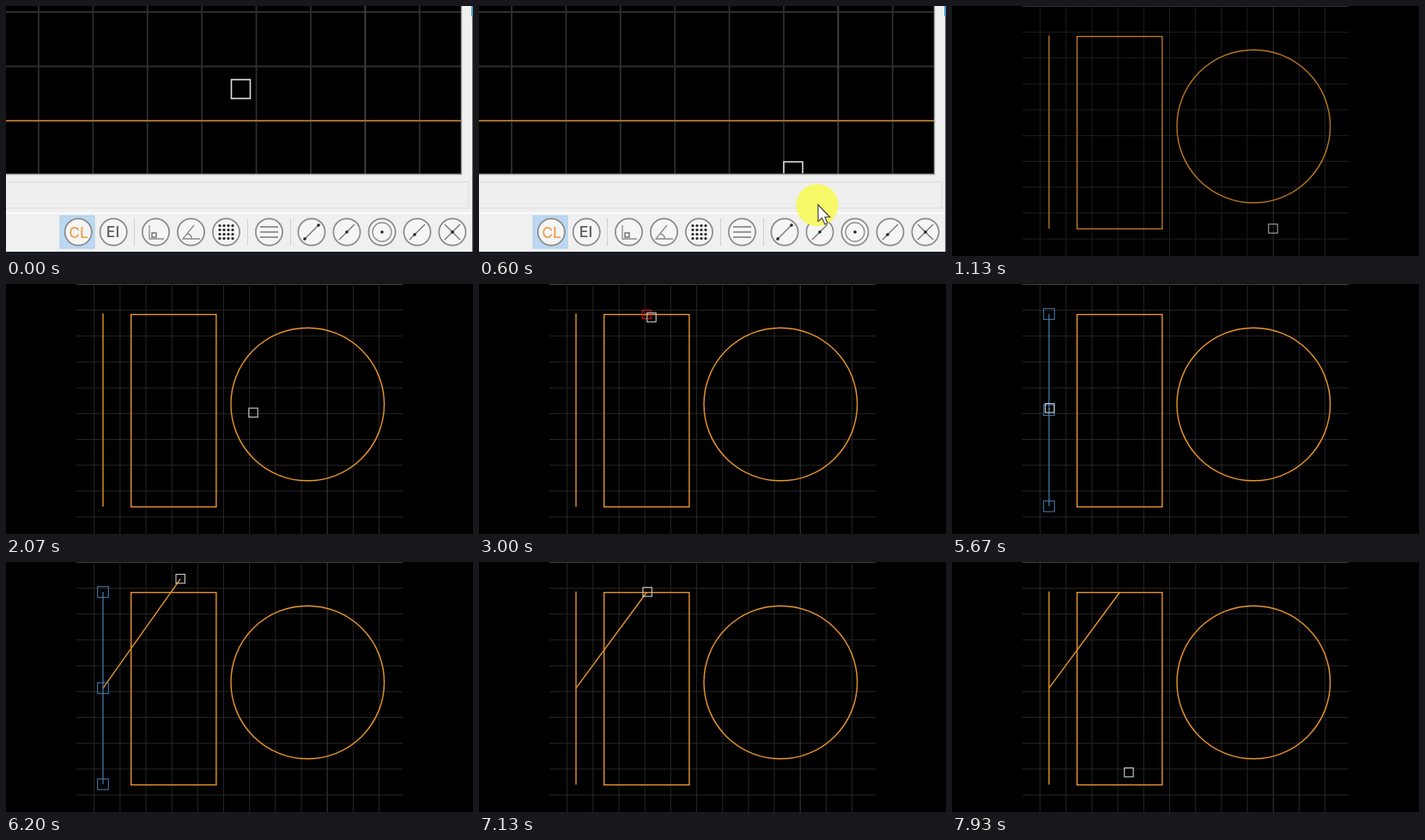
Write an HTML page that moves like this. It is 544x292 px and loops after 8000 ms.

```html
<!DOCTYPE html>
<html lang="en">
<head>
<meta charset="utf-8">
<title>Midpoint snap</title>
<style>
  html, body { margin: 0; width: 100%; height: 100%; overflow: hidden; background: #000; }
  svg { display: block; width: 544px; height: 292px; }
  text { font-family: Inter, "Open Sans", sans-serif; font-size: 17.5px; font-weight: 500; text-anchor: middle; }
</style>
</head>
<body>
<svg viewBox="0 0 544 292" fill="none">
  <defs>
    <clipPath id="view"><rect width="530" height="195.5"/></clipPath>
  </defs>
  <rect width="544" height="292" fill="#000"/>

  <g id="drawing">
    <g id="grid"></g>
    <g stroke="#e8952b" stroke-width="1.4">
      <path id="side" d="M113 34.5V260"/>
      <rect x="145.7" y="35.6" width="99.2" height="224.7"/>
      <circle cx="351.3" cy="140.5" r="89.3"/>
      <path id="band"/>
    </g>
    <g id="grips" stroke="#4a80b4">
      <path d="M113 35V259.5" stroke-width="1.2"/>
    </g>
    <g id="marker" stroke="#c41a1a" stroke-width="1.2">
      <rect x="-5" y="-5" width="10" height="10"/>
      <path d="M-5 -5L5 5M5 -5L-5 5" stroke-width=".7" opacity=".7"/>
    </g>
    <rect id="pick" x="-5.2" y="-5.2" width="10.4" height="10.4" stroke="#cfcfcf" stroke-width="1.1"/>
  </g>

  <g id="window">
    <rect width="544" height="292" fill="#f0f0f0"/>
    <rect width="530" height="196" fill="#000"/>
    <g id="bigGrid" stroke-width="1.8"></g>
    <path d="M0 134H530" stroke="#a56c2c" stroke-width="2.2"/>
    <g clip-path="url(#view)">
      <rect id="bigPick" x="-11" y="-11" width="22" height="22" stroke="#dcdcdc" stroke-width="1.6"/>
    </g>
    <path d="M530.5 0V196.5H0" stroke="#9a9a9a" stroke-width="1.4"/>
    <rect x="-2" y="205.5" width="541" height="30.5" fill="#efefef" stroke="#dcdcdc"/>
    <path d="M0 242H544" stroke="#fafafa" stroke-width="2"/>
    <path d="M543 0V12" stroke="#4b9fca" stroke-width="2"/>
    <path d="M543.5 12V292" stroke="#5a6068"/>
    <rect y="287" width="544" height="5" fill="#161822"/>
    <rect x="63" y="245" width="40" height="38" fill="#bcd8f1" stroke="#a8cdee"/>
    <path d="M149.5 248V280M281.5 248V280M331.5 248V280" stroke="#d2d2d2"/>
    <g id="buttons" fill="#f5f5f5" stroke="#8a8a8a" stroke-width="1.7"></g>
    <text x="84.5" y="270.5" fill="#e9a252">CL</text>
    <text x="124.5" y="269.5" fill="#5c5c5c">EI</text>
    <g stroke="#8c8c8c" stroke-width="1.3">
      <path d="M167 256V272H184M219 256L206 272H226M211 266Q216 267 216.5 272"/>
      <rect x="170" y="265" width="5" height="5" stroke="#666"/>
      <path d="M296 258H317M296 264H317M296 270H317" stroke="#777" stroke-width="1.7"/>
      <circle cx="438" cy="264" r="11"/>
    </g>
    <path d="M347 273L365 255M388 273L406 255M470 273L488 255M511 255L529 273M511 273L529 255" stroke="#777" stroke-width="1.4"/>
    <g id="dots" fill="#222"></g>
    <g id="mouse">
      <circle r="24.6" cy="1.5" fill="#f8f869"/>
      <path d="M1 1V20.5L5.6 16.7L9 24L12 22.5L9 15.5H14.5Z" fill="#fff" stroke="#444" stroke-width="1.2"/>
    </g>
  </g>
</svg>
<script>
const LOOP = 8000;
const SIDE = { x: 113, y: 147.3 }, LEFT = { x: 145.7, y: 148 }, TOP = { x: 195.3, y: 35.5 };
const PICKED = 5640, PLACED = 7070;
const $ = id => document.getElementById(id);

function add(parent, tag, attrs) {
  const el = document.createElementNS('http://www.w3.org/2000/svg', tag);
  for (const k in attrs) el.setAttribute(k, attrs[k]);
  $(parent).appendChild(el);
}
const rule = (parent, d, stroke) => add(parent, 'path', { d, stroke });
const dot = (cx, cy, r) => add('dots', 'circle', { cx, cy, r });

function build() {
  for (let i = 0; i < 12; i++) {
    rule('grid', `M${102.7 + i * 30.17} 0V292`, i === 9 ? '#3c3c3c' : '#272727');
    if (i < 10) rule('grid', `M82 ${0.5 + i * 30.17}H462`, i ? '#272727' : '#3c3c3c');
    if (i < 8) rule('bigGrid', `M${38 + i * 63.4} 0V196`, i === 6 ? '#434343' : '#2e2e2e');
    if (i < 2) rule('bigGrid', `M0 ${7 + i * 63.5}H530`, '#2e2e2e');
  }
  // Button groups: first centre, count
  for (const [x, n] of [[84.2, 2], [174.5, 3], [306.5, 1], [356, 5]])
    for (let i = 0; i < n; i++) add('buttons', 'circle', { cx: x + i * 41, cy: 264, r: 15.6 });
  for (let i = 0; i < 16; i++) dot(249 + i % 4 * 5, 256.5 + (i >> 2) * 5, 1.6);
  for (const [x, y] of [[348, 272], [364, 256], [397, 264], [438, 264], [476, 267], [520, 264]])
    dot(x, y, 1.8);
  for (let i = -1; i < 2; i++)
    add('grips', 'rect', { x: 106.7, y: 141 + i * 112.3, width: 12.6, height: 12.6 });
}

// Cursor stops: time, x, y
const pickPath = [
  [1150, 374, 260], [3000, 201, 39], [3470, 196, 39], [3730, 148, 140],
  [4730, 111, 122], [5200, 113, 146], [PICKED, 113, 146],
  [6200, 203.2, 19.6], [6930, 196, 32], [PLACED, 196, 32], [7950, 206, 246]
];

const clamp = v => Math.max(0, Math.min(1, v));
const ramp = (t, from, to) => clamp((t - from) / (to - from));
const ease = u => u * u * (3 - 2 * u);

function along(keys, t) {
  let [, x, y] = keys[0];
  for (let i = 1; i < keys.length; i++) {
    const a = keys[i - 1], b = keys[i], u = ease(ramp(t, a[0], b[0]));
    x += (b[1] - a[1]) * u;
    y += (b[2] - a[2]) * u;
  }
  return { x, y };
}

// The midpoint of the edge that the pick box touches
function snapFor({ x, y }) {
  if (Math.abs(x - SIDE.x) < 6) return SIDE;
  if (Math.abs(y - TOP.y) < 6) return TOP;
  if (Math.abs(x - LEFT.x) < 6 && y > TOP.y) return LEFT;
}

const place = (id, { x, y }) => $(id).setAttribute('transform', `translate(${x} ${y})`);
const show = (id, on) => $(id).setAttribute('display', on ? 'inline' : 'none');
const fade = (id, a) => $(id).setAttribute('opacity', a);

function draw(t) {
  fade('window', 1 - ramp(t, 800, 1000));
  fade('drawing', ramp(t, 1000, 1165));
  place('bigPick', along([[130, 273.5, 97], [420, 366, 193]], t));
  place('mouse', along([[440, 368, 196], [600, 394, 231], [850, 397, 260]], t));
  show('mouse', t >= 440);

  const pick = along(pickPath, t);
  const picking = t >= PICKED && t < PLACED;
  place('pick', pick);
  show('grips', picking);
  show('side', !picking);
  show('band', t >= PICKED);
  const end = picking ? pick : TOP;
  $('band').setAttribute('d', `M${SIDE.x} ${SIDE.y}L${end.x} ${end.y}`);

  const snap = t < PLACED && snapFor(pick);
  const shown = snap && !(picking && snap === SIDE);
  show('marker', shown);
  if (shown) {
    place('marker', snap);
    fade('marker', clamp(1.1 - Math.hypot(pick.x - snap.x, pick.y - snap.y) / 50));
  }
}

build();
const start = performance.now();
function tick() {
  draw((performance.now() - start) % LOOP);
  requestAnimationFrame(tick);
}
tick();
</script>
</body>
</html>
```
